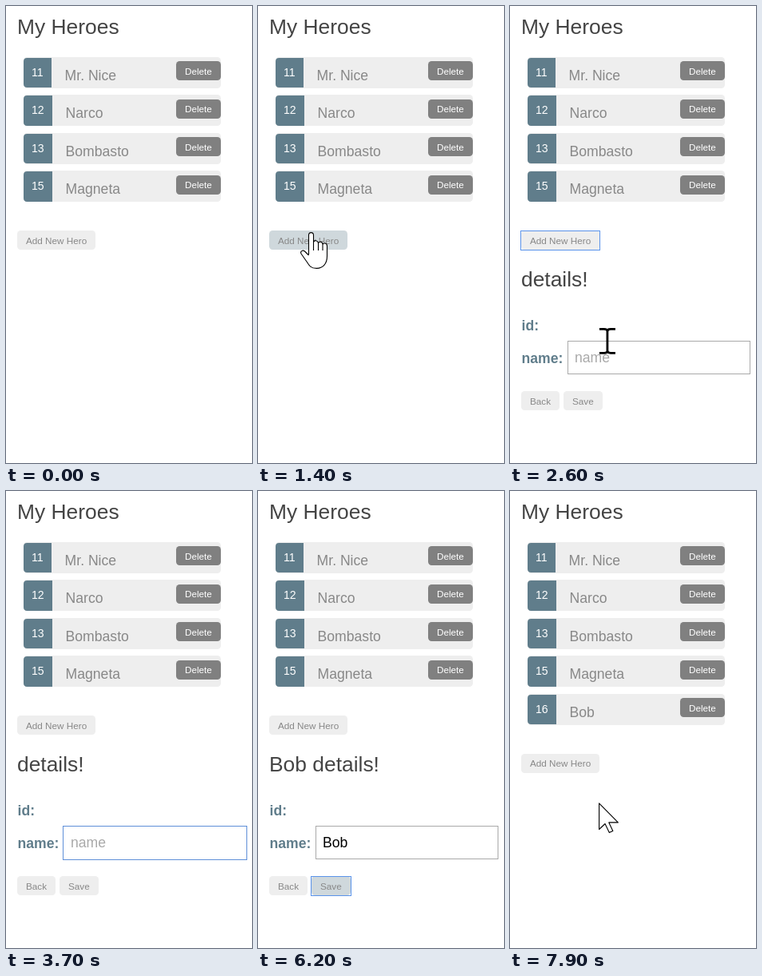
These frames come from a looping animation (308x572 px, 8000 ms). An HTML page:

```html
<!DOCTYPE html>
<html lang="en">
<head>
<meta charset="utf-8">
<title>My Heroes</title>
<style>
  html, body { margin: 0; width: 100%; height: 100%; overflow: hidden; background: #fff; }
  svg { display: block; font: 17.6px "Liberation Sans", Arial, sans-serif; fill: #888; }
  .title { font-size: 26.4px; fill: #444; }
  .badge { font-size: 14.08px; fill: #fff; }
  .label { font-weight: bold; fill: #607d8b; }
  .btn text { font-size: 11.73px; }
  .btn rect { fill: #eee; }
  .btn.hover rect { fill: #cfd8dc; }
  .btn.delete rect { fill: #808080; }
  .btn.delete text { fill: #fff; }
  .ring { fill: none; stroke: #5a93ea; }
  #cursor path { fill: #fff; stroke: #000; stroke-width: 1.1; stroke-linejoin: round; }
  #cursor #ibeam { fill: none; stroke-width: 2.8; }
</style>
</head>
<body>
<svg width="308" height="572" viewBox="0 0 308 572">
  <text class="title" x="14" y="35">My Heroes</text>
  <g id="rows"></g>
  <g id="addTop"></g>
  <g id="addLow"></g>
  <g id="details">
    <text class="title" id="heading" x="14" y="351"></text>
    <text class="label" x="14.5" y="406">id:</text>
    <text class="label" x="14.5" y="447">name:</text>
    <rect id="box" fill="#fff"/>
    <text id="value" x="81" y="446"></text>
    <rect id="caret" y="430" width="1" height="20" fill="#000"/>
    <g id="buttons"></g>
  </g>
  <rect class="ring" id="addRing" x="13.5" y="281.5" width="99" height="24"/>
  <rect class="ring" id="saveRing" x="66.5" y="482.5" width="50" height="24"/>
  <g id="cursor">
    <path id="arrow" d="M.6 .9V33.5L8 26.5L13.3 37.6L17.8 35.5L12.8 24.9H24.3Z"/>
    <path id="hand" transform="translate(-13)" d="M10.5 28V4C10.5-.5 16.5-.5 16.5 4V13C17 9.5 22 10 22.5 14C23.5 11 28 12 28 15.5C29 13 33.5 13.5 33.5 17.5V30C33.5 40 28 45.4 20.5 45.4C13 45.4 11 42 8 37L1 27C-.5 24 3 22 5.5 24L10.5 29M16.5 13V23M22.5 14V23M28 15.5V23"/>
    <path id="ibeam" d="M-10-15H-4Q0-15 0-12Q0-15 4-15H10M0-12V12M-10 15H-4Q0 15 0 12Q0 15 4 15H10"/>
  </g>
</svg>
<script>
const LOOP = 8000, STEP = 100, PITCH = 47.5;
const el = id => document.getElementById(id);
const show = (id, on) => el(id).style.display = on ? '' : 'none';
const within = (t, a, b) => t >= a && t < b;

const button = (label, x, y, w, kind = '') => `<g class="btn ${kind}">
  <rect x="${x}" y="${Math.round(y)}" width="${w}" height="24" rx="4.4"/>
  <text x="${x + 11}" y="${Math.floor(y + 17)}">${label}</text></g>`;

function row([id, name], i) {
  const dy = PITCH * i, textDy = Math.floor(dy);
  const top = Math.round(64.5 + dy), bottom = Math.round(102 + dy);
  const right = i ? 58 : 57;
  return `<g id="row${i}">
    <rect x="22" y="${64 + textDy}" width="247" height="39" rx="4.4" fill="#eee"/>
    <path d="M${right} ${top}V${bottom}H26.4q-4.4 0-4.4-4.4V${top + 4.4}q0-4.4 4.4-4.4z" fill="#607d8b"/>
    <text class="badge" x="32" y="${88 + textDy}">${id}</text>
    <text x="${right + 16.6}" y="${93 + textDy}">${name}</text>
    ${button('Delete', 213, 69 + dy, 56, 'delete')}</g>`;
}

el('rows').innerHTML = [[11, 'Mr. Nice'], [12, 'Narco'], [13, 'Bombasto'],
  [15, 'Magneta'], [16, 'Bob']].map(row).join('');
el('addTop').innerHTML = button('Add New Hero', 14, 281, 98);
el('addLow').innerHTML = button('Add New Hero', 14, 281 + PITCH, 98);
el('buttons').innerHTML = button('Back', 14, 482, 48) + button('Save', 67, 482, 49);
const addButton = el('addTop').firstChild, saveButton = el('buttons').lastChild;

// Pointer keys: time, x, y; a key without a position hides the pointer.
const pointerKeys = [
  [0], [700, 254, 382], [1400, 66, 283], [1900, 66, 283], [2800, 130, 439], [3100],
  [5100, 121, 435.5], [5200, 120, 432], [5400, 120, 432], [5800, 107, 501], [6200],
  [7100], [7200, 106, 501], [7400, 84, 496], [7500, 84, 496], [7900, 111, 390], [LOOP]
];

function pointerAt(t) {
  const i = pointerKeys.findLastIndex(k => k[0] <= t);
  const [t0, x0, y0] = pointerKeys[i], [t1, x1 = x0, y1 = y0] = pointerKeys[i + 1] || [LOOP];
  if (x0 === undefined) return null;
  const u = (t - t0) / (t1 - t0), e = u * u * (3 - 2 * u);
  return [x0 + (x1 - x0) * e, y0 + (y1 - y0) * e];
}

function setBox(focused) {
  const [x, w, h, stroke] = focused ? [71.5, 230, 42, '#5f8fd8'] : [72.5, 228, 41, '#aaa'];
  Object.entries({ x, y: 419.5, width: w, height: h, stroke })
    .forEach(([k, v]) => el('box').setAttribute(k, v));
}

function draw(t) {
  const open = within(t, 1700, 6800), added = t >= 7100;
  show('row4', added);
  show('addTop', !added);
  show('addLow', added);
  show('details', open);
  show('addRing', within(t, 1600, 3000));
  show('saveRing', within(t, 6100, 6800));
  setBox(within(t, 3000, 6100));

  const typed = t < 4100 ? '' : t < 4400 ? 'B' : t < 4500 ? 'Bo' : 'Bob';
  el('heading').textContent = (t < 4300 ? '' : typed + ' ') + 'details!';
  el('value').textContent = typed || 'name';
  el('value').style.fill = typed ? '#000' : '#a9a9a9';
  show('caret', within(t, 3100, 3700) || within(t, 4100, 5100) || within(t, 5500, 6000));
  const textWidth = open && typed ? el('value').getComputedTextLength() : 0;
  el('caret').setAttribute('x', Math.round(81 + textWidth));

  const p = pointerAt(t);
  const over = (x0, y0, x1, y1) => p && within(p[0], x0, x1) && within(p[1], y0, y1);
  const onAdd = !added && over(14, 281, 112, 305);
  const onSave = open && over(67, 482, 116, 506);
  const onInput = open && over(72, 419, 301, 461);
  addButton.classList.toggle('hover', !!onAdd);
  saveButton.classList.toggle('hover', !!onSave || within(t, 6200, 6800));
  show('cursor', p);
  if (p) el('cursor').setAttribute('transform', `translate(${p})`);
  show('hand', onAdd || onSave);
  show('ibeam', onInput);
  show('arrow', !(onAdd || onSave || onInput));
}

const start = performance.now();
function tick() {
  const t = (performance.now() - start) % LOOP;
  draw(Math.floor(t / STEP) * STEP);
  requestAnimationFrame(tick);
}
tick();
</script>
</body>
</html>
```
